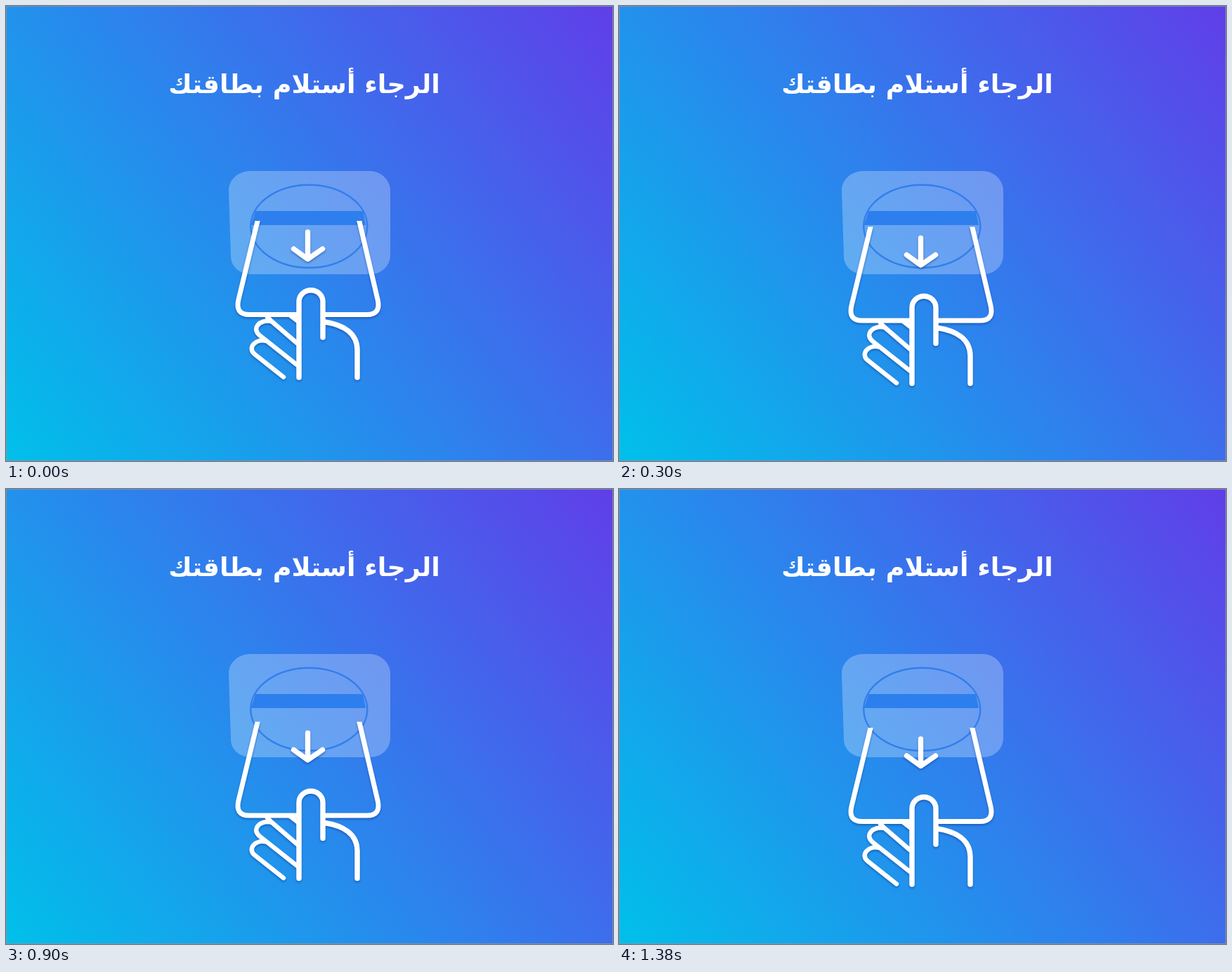
Write an HTML page that moves like this. It is 864 px wide and 648 px high and loops after 1.5 s.

```html
<!DOCTYPE html>
<html lang="ar">
<head>
<meta charset="utf-8">
<style>
  html, body { margin: 0; width: 100%; height: 100%; overflow: hidden; }
  body {
    box-sizing: border-box;
    background: linear-gradient(53deg, #00c0ea, #2f80ed 50%, #603ee9);
  }
  svg { position: absolute; inset: 0; width: 864px; height: 648px; }
  text { font: bold 36.5px "DejaVu Sans", sans-serif; fill: #fff; }
  #tray {
    fill: none; stroke: #fff; stroke-width: 7.5;
    stroke-linecap: round; stroke-linejoin: round;
    filter: drop-shadow(0 2px 1.5px rgba(0, 35, 120, .4));
  }
</style>
</head>
<body>
<svg viewBox="0 0 864 648">
  <clipPath id="cut"><path d="M310 306H550V460H310Z"/></clipPath>
  <rect x=".5" y=".5" width="863" height="647" fill="none" stroke="#8a94a6" stroke-opacity=".8"/>
  <text x="424.5" y="124" text-anchor="middle" direction="rtl">الرجاء أستلام بطاقتك</text>

  <!-- card slot -->
  <path fill="#fff" fill-opacity=".27" d="M317 263C317 247 331 235 348 235H517C534 235 547 248 547 263V354C547 370 535 382 518 382H350C332 382 320 371 320 356Z"/>
  <path fill="#2d7fed" d="M355 292H508L512 312H349Z"/>
  <ellipse cx="431.3" cy="313.8" rx="83" ry="59" fill="none" stroke="#327eec" stroke-width="2.4"/>

  <g id="tray">
    <g clip-path="url(#cut)" stroke-width="7">
      <path d="M361 294L331 418Q326 439.5 346 439.5H413M454 439.5H514Q534 439.5 529 418L500 294"/>
    </g>
    <path d="M429.5 322V360M409.5 346L429.5 360.5L450.5 346"/>
    <!-- thumb and back of the hand -->
    <path d="M417 529V421A17 16.3 0 0 1 451 421V472M454 450C480 454 500 466 500 490V529"/>
    <!-- fingers -->
    <g stroke-width="6.5">
      <path d="M372 443L378 449L414 480M378 449C361 446 349 459 361 469L414 511M371 477C355 473 343 487 354 496L395 528.5M405 441L414 448"/>
    </g>
  </g>
</svg>
<script>
  const tray = document.getElementById("tray");
  const stepTime = 300, steps = 5, stepY = 8.5;

  function draw() {
    const step = Math.floor(performance.now() / stepTime) % steps;
    tray.setAttribute("transform", `translate(0 ${step * stepY})`);
    requestAnimationFrame(draw);
  }
  draw();
</script>
</body>
</html>
```
